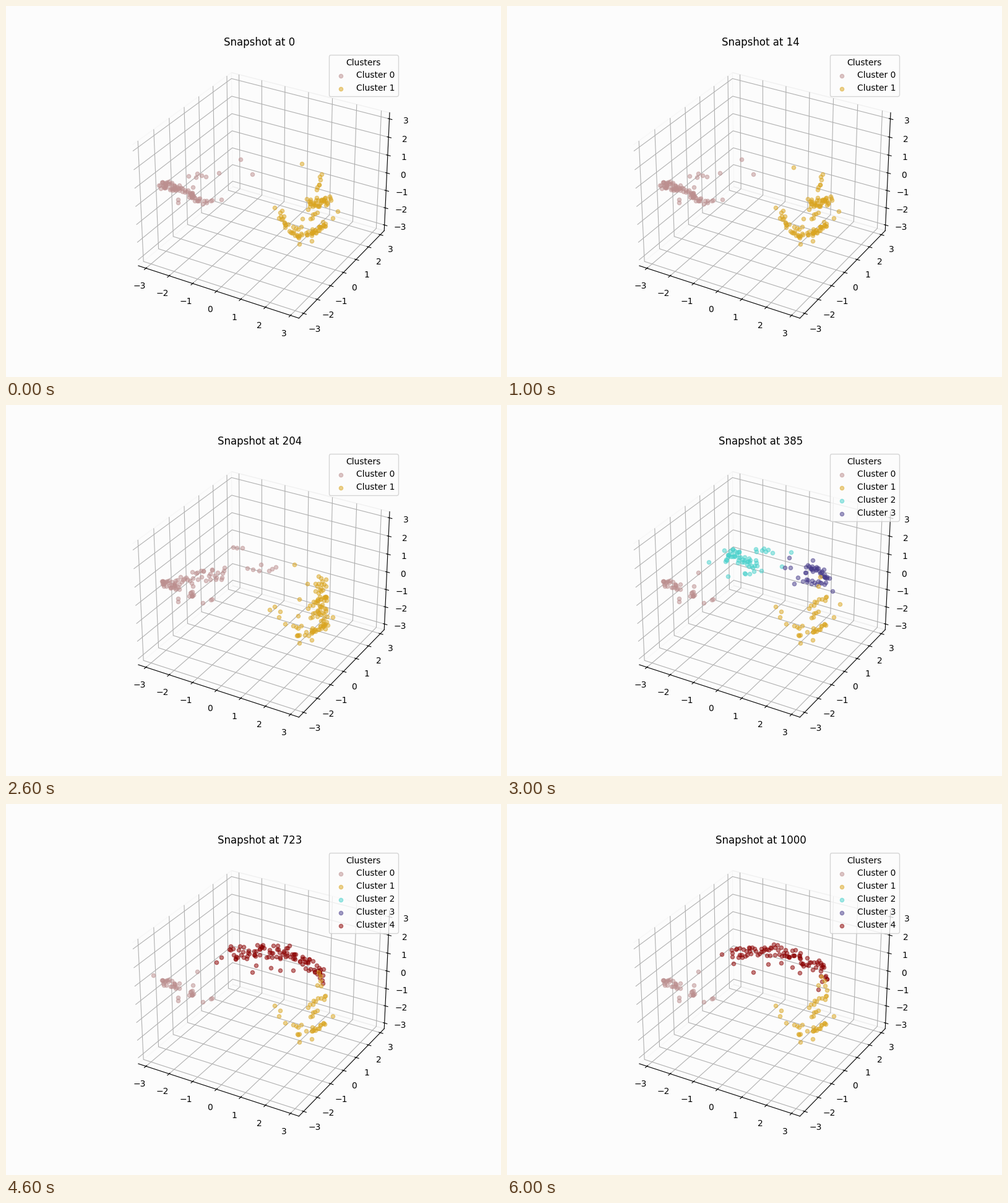
A matplotlib script for the animation above (7000 ms loop, 800x600 px).

```python
import numpy as np
import matplotlib.pyplot as plt
from matplotlib.animation import FuncAnimation

W, H = 800, 600
BG = "#fcfcfc"
COLORS = ["rosybrown", "goldenrod", "mediumturquoise", "darkslateblue", "darkred"]
plt.rcParams.update({"figure.facecolor": BG, "axes.facecolor": BG})

rng = np.random.default_rng(12)


def strand(path, n, rx, ry):
    """n points spread along a path, each moved at random within an ellipse."""
    knots = np.array(path, float)
    length = np.hypot(*np.diff(knots, axis=0).T)
    pos = np.concatenate([[0], np.cumsum(length)])
    s = (np.arange(n) + rng.uniform(0, 1, n)) / n * pos[-1]
    angle = rng.uniform(0, 2 * np.pi, n)
    radius = np.sqrt(rng.uniform(0, 1, n))
    return np.column_stack([
        np.interp(s, pos, knots[:, 0]) + rx * radius * np.cos(angle),
        np.interp(s, pos, knots[:, 1]) + ry * radius * np.sin(angle)])


def join(*groups):
    return np.vstack([np.array(g, float) for g in groups])


# Points that stay through the whole run
rose = join(
    strand([(248, 288), (262, 290), (280, 294)], 22, 4, 6),
    strand([(296, 306), (302, 305)], 8, 3, 5),
    strand([(317, 321), (338, 310)], 3, 1, 1),
    [(309, 271), (302, 293), (278, 313), (278, 318)])
gold = join(
    strand([(461, 355), (477, 357)], 4, 2, 5),
    strand([(471, 372), (475, 373)], 3, 2, 3),
    strand([(488, 367), (506, 359), (516, 352)], 14, 3, 5),
    strand([(490, 347), (505, 331)], 5, 2, 3),
    strand([(486, 326), (503, 316), (520, 312)], 10, 2, 4),
    [(434, 326), (443, 334), (441, 343), (451, 354), (474, 385),
     (494, 380), (528, 343), (503, 293)])

# First two snapshots
rose_start = join(
    rose,
    strand([(246, 291), (268, 294), (300, 307), (322, 320)], 42, 5, 6),
    strand([(286, 279), (346, 272)], 5, 2, 4),
    [(379, 248), (398, 272), (348, 313)])
gold_start = join(
    gold,
    strand([(445, 331), (447, 348), (472, 374), (503, 363), (518, 350)], 34, 5, 6),
    strand([(488, 317), (524, 316)], 28, 4, 9),
    strand([(510, 267), (502, 300)], 6, 2, 2),
    [(536, 332), (479, 344)])

# Spreading
rose_mid = join(
    rose,
    strand([(252, 288), (280, 284), (325, 277), (358, 268)], 42, 5, 12),
    strand([(366, 231), (384, 231)], 3, 1, 1),
    strand([(386, 260), (442, 267)], 7, 2, 7))
gold_mid = join(
    gold,
    strand([(509, 280), (509, 315), (513, 360)], 50, 10, 6),
    strand([(472, 374), (510, 362)], 7, 4, 4),
    [(466, 258), (487, 289), (474, 314), (426, 331), (472, 341)])

# Two new groups
turquoise = join(
    strand([(350, 252), (368, 238), (376, 251), (404, 261)], 42, 7, 9),
    strand([(399, 233), (430, 235)], 7, 2, 5),
    strand([(376, 273), (411, 269)], 5, 2, 2),
    [(326, 254), (351, 235), (357, 277), (444, 261), (459, 238)])
slate = join(
    strand([(482, 264), (508, 269), (518, 285)], 32, 6, 7),
    strand([(478, 285), (514, 289)], 12, 3, 4),
    [(456, 247), (458, 263), (449, 263), (464, 289), (470, 279),
     (494, 251), (526, 301)])

# The two groups merged into one arc
red_late = join(
    strand([(362, 241), (384, 242), (424, 238), (456, 239), (474, 251),
            (504, 266), (515, 282)], 98, 6, 12),
    [(340, 256), (348, 248), (398, 272), (404, 261), (428, 265),
     (443, 269), (464, 269)])
red_end = join(
    strand([(363, 241), (390, 238), (450, 236), (478, 253), (506, 262),
            (514, 284)], 88, 5, 10),
    [(347, 243), (366, 258), (398, 272), (422, 259), (443, 257),
     (461, 264), (473, 273), (503, 300)])

gold_late = join(gold, strand([(504, 266), (513, 300)], 4, 3, 2))
gold_last = join(gold, strand([(506, 277), (520, 304)], 4, 7, 2))
NONE = np.empty((0, 2))

# Snapshot number and the points of each cluster
SCENES = [
    (0, [rose_start, join(gold_start, [(478, 255)])]),
    (14, [rose_start, join(gold_start, [(463, 261)])]),
    (204, [rose_mid, gold_mid]),
    (385, [rose, join(gold, [(538, 322), (506, 278)]), turquoise, slate]),
    (723, [join(rose, [(238, 277)]), gold_late, NONE, NONE, red_late]),
    (998, [rose, gold_last, NONE, NONE, red_end]),
    (1000, [rose, gold_last, NONE, NONE, red_end]),
]

fig = plt.figure(figsize=(W / 100, H / 100), dpi=100)
ax = fig.add_subplot(projection="3d")
for set_lim in (ax.set_xlim, ax.set_ylim, ax.set_zlim):
    set_lim(-10 / 3, 10 / 3, view_margin=0)
for axis in (ax.xaxis, ax.yaxis, ax.zaxis):
    axis.pane.fill = False

# Overlay in stage pixels; the front cluster is drawn last
stage = fig.add_axes([0, 0, 1, 1])
stage.set(xlim=(0, W), ylim=(H, 0))
stage.axis("off")
dots = [stage.scatter([], [], s=20, color=c, alpha=0.5, label=f"Cluster {k}",
                      zorder=3 if c == "goldenrod" else 2)
        for k, c in enumerate(COLORS)]


def draw(i):
    number, clusters = SCENES[i]
    ax.set_title(f"Snapshot at {number}")
    for k, dot in enumerate(dots):
        dot.set_offsets(clusters[k] if k < len(clusters) else NONE)
    ax.legend(handles=dots[:len(clusters)], title="Clusters", loc="upper right")
    return dots


anim = FuncAnimation(fig, draw, frames=len(SCENES), interval=1000,
                     repeat=True, repeat_delay=0)
plt.show()
```
